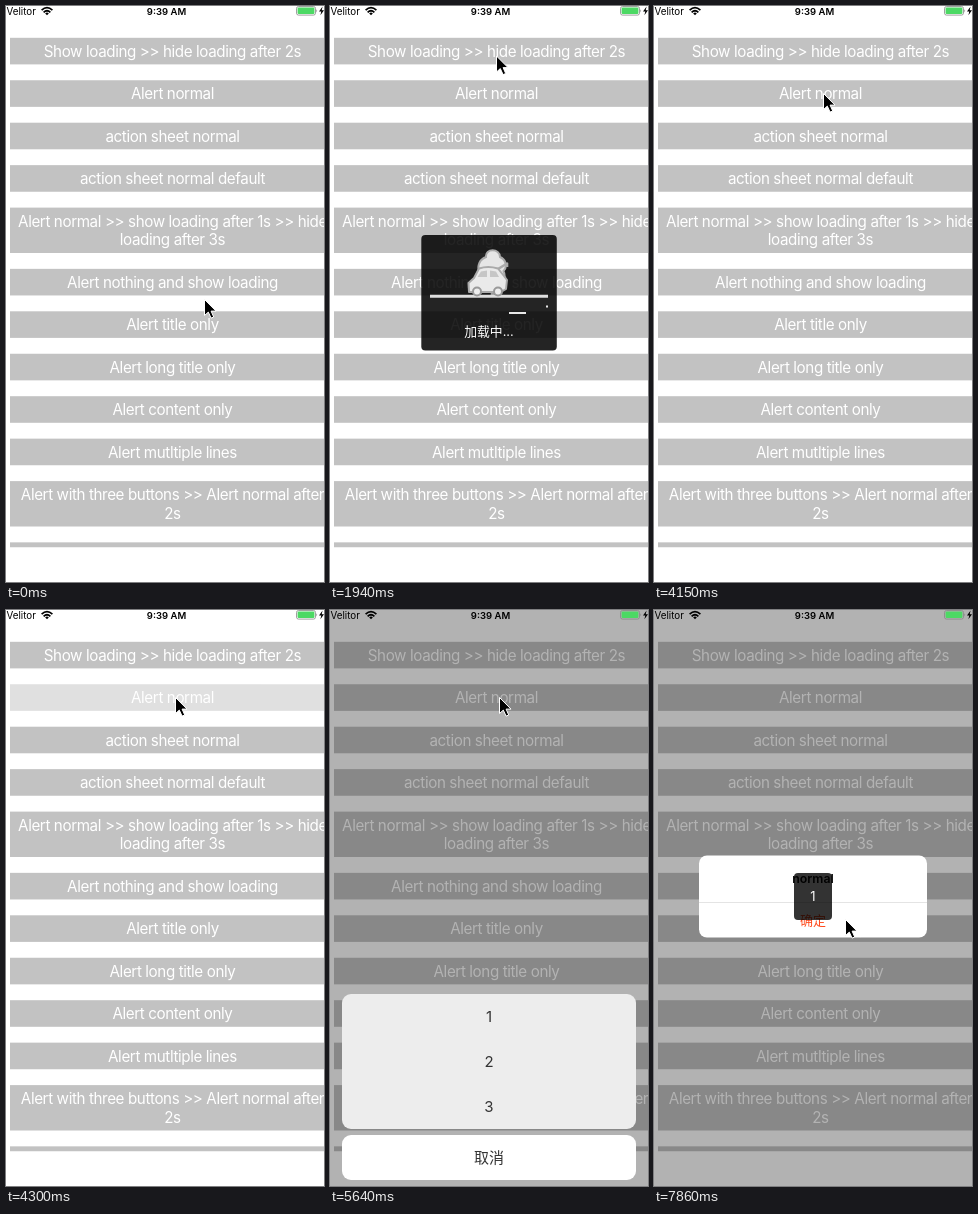
Animation, 318 px wide and 576 px high, one loop 8000 ms. Source, as an HTML page:

```html
<!DOCTYPE html>
<html lang="en">
<head>
<meta charset="utf-8">
<title>Alert and loading demo</title>
<style>
  html, body { margin: 0; width: 100%; height: 100%; overflow: hidden; background: #fff; }
  svg { display: block; width: 100%; height: 100%; }
  text { font-family: Inter, "Noto Sans CJK SC", "Noto Sans CJK", sans-serif; text-anchor: middle; }
  .row rect { fill: #c2c2c2; }
  .row text { fill: #fff; font-size: 15.2px; letter-spacing: -.4px; }
  #sheet text { fill: #333; font-size: 15px; }
</style>
</head>
<body>
<svg viewBox="0 0 318 576">
  <defs>
    <clipPath id="listClip"><rect width="318" height="541.3"/></clipPath>
    <clipPath id="sheetClip"><rect x="12" y="384" width="294" height="135" rx="9"/></clipPath>
    <clipPath id="roadClip"><rect x="100" y="232" width="118" height="80"/></clipPath>
  </defs>

  <g id="list" clip-path="url(#listClip)"></g>
  <rect id="dim" width="318" height="576"/>

  <g id="status">
    <text x="0.5" y="8.6" font-size="9.8" style="text-anchor:start">Velitor</text>
    <g fill="none" stroke="#000" stroke-width="1.7">
      <path d="M35.6 4.2Q41 -.8 46.4 4.2M37.6 6.3Q41 3.2 44.4 6.3"/>
      <path d="M39.2 7.4Q41 5.8 42.8 7.4L41 9.3Z" fill="#000" stroke="none"/>
    </g>
    <text x="160.5" y="8.6" font-size="9.5" font-weight="600">9:39 AM</text>
    <rect x="290.5" y=".5" width="19" height="8.6" rx="2" fill="none" stroke="#888" stroke-width=".8"/>
    <rect x="291.6" y="1.6" width="16.8" height="6.4" rx="1" fill="#4cd964"/>
    <path d="M310.4 3.2q1.6 1.6 0 3.2Z" fill="#888"/>
    <path d="M316.6 .6L313 5.6H315.3L314.4 9.2L318 4.2H315.7Z"/>
  </g>

  <g id="loader">
    <rect x="91.3" y="229" width="135.5" height="115.5" rx="4" fill-opacity=".86"/>
    <g clip-path="url(#roadClip)">
      <g id="tree" fill="#e6e6e6" stroke="#aaa" stroke-width="2">
        <circle cx="190.5" cy="281.5" r="5.6"/>
        <path d="M204.5 264V290" stroke="#a0a0a0" stroke-width="3.5"/>
        <path d="M198 251C197 242 212 242 212 251C219 254 219 262 215.500 265C219 273 214 281 207 279.500C199 283 190 277 193.500 269C188 263 190 254 198 251Z"/>
        <path d="M204.5 265V290" stroke="#999" stroke-width="2.4"/>
      </g>
      <path id="dashes" stroke="#e8e8e8" stroke-width="2.2"/>
    </g>
    <path d="M100 290.3H218" stroke="#dedede" stroke-width="3"/>
    <g id="car" stroke-linejoin="round">
      <path d="M168 263L177 257.500V261" fill="none" stroke="#aaa" stroke-width="2.6"/>
      <path d="M139 286L138.500 277L144 272L149 262.500Q158 259.500 168 262.500L174 270L177 274L176 283L171 286Z" fill="#eaeaea" stroke="#aaa" stroke-width="2"/>
      <path d="M147.500 271L151 265.500L157 264.500V271ZM160 264.500L166 265.500L169 271H160Z" fill="#c6c6c6"/>
      <g fill="#eee" stroke="#999" stroke-width="2"><circle cx="147" cy="285.500" r="4"/><circle cx="168" cy="285.500" r="4"/></g>
    </g>
    <text x="159" y="329.5" font-size="12.8" fill="#fff">加载中...</text>
  </g>

  <g id="alert">
    <rect x="45" y="245.500" width="228" height="82" rx="8" fill="#fff"/>
    <text x="159" y="273" font-size="12.3" font-weight="600">normal</text>
    <path d="M45 292.500H273" stroke="#e4e4e4"/>
    <text x="159" y="315" font-size="13" fill="#ff4a1c">确定</text>
  </g>

  <g id="sheet">
    <g clip-path="url(#sheetClip)">
      <rect x="12" y="384" width="294" height="135" fill="#ededed"/>
      <rect id="pick" x="12" y="429" width="294" height="45.500" fill="#e3e3e3"/>
    </g>
    <rect x="12" y="525" width="294" height="45" rx="9" fill="#fff"/>
    <text x="159" y="412">1</text>
    <text x="159" y="457">2</text>
    <text x="159" y="502">3</text>
    <text x="159" y="553">取消</text>
  </g>

  <g id="toast">
    <rect x="140" y="263" width="38" height="47" rx="4" fill-opacity=".8"/>
    <text x="159" y="291.3" font-size="13" fill="#fff">1</text>
  </g>

  <path id="cursor" d="M0 0V16L3.800 12.600L6.600 18.600L9.200 17.500L6.600 11.600H11.500Z" stroke="#fff" stroke-width="1"/>
</svg>

<script>
const LOOP = 8000, STEP = 148.2, LAST_TICK = 53;
const $ = id => document.getElementById(id);

const labels = [
  'Show loading >> hide loading after 2s',
  'Alert normal',
  'action sheet normal',
  'action sheet normal default',
  'Alert normal >> show loading after 1s >> hide|loading after 3s',
  'Alert nothing and show loading',
  'Alert title only',
  'Alert long title only',
  'Alert content only',
  'Alert mutltiple lines',
  'Alert with three buttons >> Alert normal after|2s',
  ''
];

function svgNode(parent, tag, attrs, content = '') {
  const node = document.createElementNS('http://www.w3.org/2000/svg', tag);
  for (const name in attrs) node.setAttribute(name, attrs[name]);
  node.textContent = content;
  return parent.appendChild(node);
}

let top_ = 31.8;
const rows = labels.map(label => {
  const lines = label.split('|');
  const height = 26.6 + (lines.length - 1) * 18.8;
  const row = svgNode($('list'), 'g', { class: 'row' });
  svgNode(row, 'rect', { x: 4, y: top_, width: 325, height });
  lines.forEach((line, i) => svgNode(row, 'text', { x: 166.5, y: top_ + 19 + i * 18.7 }, line));
  top_ += height + 15.85;
  return row;
});

// Piecewise interpolation over [tick, value] pairs.
function track(tick, keys, ease = x => x) {
  let [from, value] = keys[0];
  for (const [to, next] of keys) {
    if (tick < to) return value + (next - value) * ease(Math.max(0, (tick - from) / (to - from)));
    [from, value] = [to, next];
  }
  return value;
}
const smooth = x => x * x * (3 - 2 * x);
const wrap = (x, size) => ((x % size) + size) % size;
const show = (id, opacity) => $(id).setAttribute('opacity', +opacity);
const move = (id, x, y) => $(id).setAttribute('transform', `translate(${x} ${y})`);

function drawLoader(tick) {
  const travel = (tick - 19) * 18;
  move('tree', wrap(120 - travel, 150) - 120, 0);
  move('car', 0, tick % 2 ? 0 : -0.8);
  const first = 108 + wrap(17 - travel, 135) - 17;
  const second = 206 + wrap(120 - travel, 135) - 120;
  $('dashes').setAttribute('d', `M${first} 300.500h17M${second} 307h17`);
}

function render(time) {
  const tick = Math.min(LAST_TICK, Math.floor((time + 5) / STEP));

  rows[0].setAttribute('opacity', track(tick, [[9, 1], [11, .35], [13, 1]]));
  rows[1].setAttribute('opacity', track(tick, [[28, 1], [29, .5], [31, 1]]));

  show('loader', tick >= 11 && tick < 24);
  drawLoader(tick);

  const fade = track(tick, [[29, 0], [31, 1]]);
  show('dim', fade * .3);
  show('alert', tick < 36 ? fade : track(tick, [[49, 0], [51, 1]]));
  show('toast', track(tick, [[49, 0], [51, 1]]));

  show('sheet', tick >= 36 && tick < 50);
  move('sheet', 0, track(tick, [[36, 188], [37, 55], [38, 0], [47, 0], [48, 45], [50, 195]]));
  show('pick', tick >= 47);

  move('cursor',
    track(tick, [[3, 198.5], [8, 166.5], [25, 166.5], [28, 169.5], [40, 169.5], [46, 172.5], [49, 172.5], [53, 191.5]], smooth),
    track(tick, [[3, 293.5], [8, 50], [25, 50], [28, 87.5], [40, 87.5], [46, 449], [49, 449], [53, 309.5]], smooth));
}

const start = performance.now();
function loop() {
  render((performance.now() - start) % LOOP);
  requestAnimationFrame(loop);
}
loop();
</script>
</body>
</html>
```
